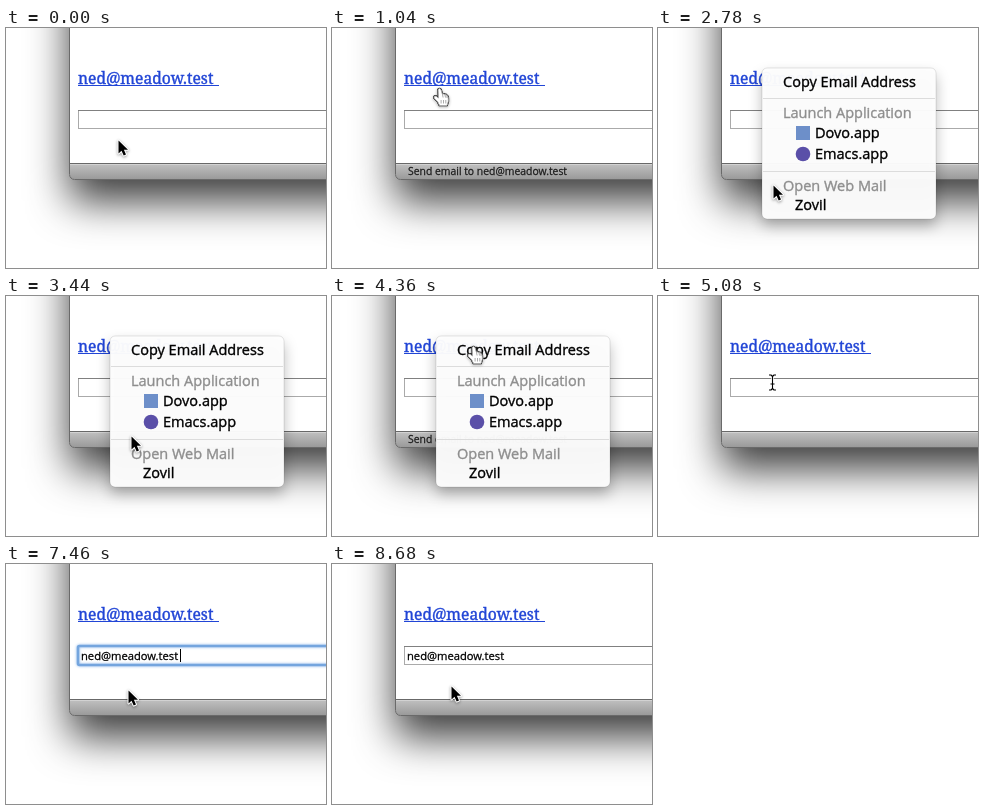
An HTML page with a canvas for the animation above (8760 ms loop, 320 px wide and 240 px high).

```html
<!DOCTYPE html>
<html lang="en">
<head>
<meta charset="utf-8">
<title>Copying an email address</title>
<style>
html, body { margin: 0; width: 100%; height: 100%; overflow: hidden; background: #fff; }
canvas { display: block; }
</style>
</head>
<body>
<canvas id="stage" width="320" height="240"></canvas>
<script>
const ctx = document.getElementById('stage').getContext('2d');
const LOOP = 8760;
const ADDRESS = 'ned@meadow.test';
const SANS = '"Open Sans", "Noto Sans", sans-serif';
const SERIF = '"Noto Serif", "Liberation Serif", serif';

// Pointer path: time, x, y, optional power that delays the easing
const PATH = [
  [0, 112, 112], [440, 112, 112], [1300, 106, 46], [1380, 106, 46], [1420, 105, 45],
  [2180, 105, 45], [3020, 117, 185], [3840, 141, 50, 1.42], [4360, 141, 50],
  [5080, 114, 86], [5720, 114, 86], [6700, 128, 132], [7000, 128, 132],
  [7780, 119, 122], [LOOP, 119, 122]
];

const MENUS = [
  {
    x: 104, y: 40, w: 174, h: 151, open: 2180, close: 4360, rules: [70, 143], row: 20,
    items: [
      ['Copy Email Address', 125, 59], ['Launch Application', 125, 90, true],
      ['Dovo.app', 157, 110], ['Emacs.app', 157, 131],
      ['Open Web Mail', 125, 163, true], ['Zovil', 137, 182]
    ],
    icons() {
      ctx.fillStyle = '#6d8fc9';
      ctx.fillRect(138, 98, 14, 14);
      ctx.fillStyle = '#5a4fa8';
      ctx.beginPath();
      ctx.arc(145, 126, 7.3, 0, 7);
      ctx.fill();
    }
  },
  {
    x: 114, y: 80, w: 230, h: 200, open: 5700, close: 6920, rules: [149], row: 19,
    items: [
      ['Cut', 135, 99, true], ['Copy', 135, 118, true], ['Paste', 135, 137],
      ['Spelling and Grammar', 135, 168], ['Substitutions', 135, 187],
      ['Transformations', 135, 206], ['Font', 135, 225], ['Speech', 135, 244]
    ]
  }
];

const clamp = v => Math.max(0, Math.min(1, v));
const within = (t, a, b) => t >= a && t < b;

function pointerAt(t) {
  const i = PATH.findIndex(k => k[0] > t);
  const [t0, x0, y0] = PATH[i - 1], [t1, x1, y1, power = 1] = PATH[i];
  const u = ((t - t0) / (t1 - t0)) ** power;
  const p = u * u * (3 - 2 * u);
  return { x: x0 + (x1 - x0) * p, y: y0 + (y1 - y0) * p };
}

// A hairline stroke gives the slightly heavy look of smoothed type
function text(str, x, y, size, color, family = SANS) {
  ctx.font = `${size}px ${family}`;
  ctx.fillStyle = ctx.strokeStyle = color;
  ctx.lineWidth = size * .025;
  ctx.fillText(str, x, y);
  ctx.strokeText(str, x, y);
}

function roundRect(x, y, w, h, r) {
  ctx.beginPath();
  ctx.roundRect(x, y, w, h, r);
}

function shadow(color, blur, dy) {
  ctx.shadowColor = color;
  ctx.shadowBlur = blur;
  ctx.shadowOffsetY = dy;
}

function vertical(y0, y1, ...colors) {
  const g = ctx.createLinearGradient(0, y0, 0, y1);
  colors.forEach((c, i) => g.addColorStop(i / (colors.length - 1), c));
  return g;
}

function drawWindow(status) {
  ctx.save();
  shadow('rgba(0,0,0,.76)', 40, 22);
  roundRect(63.5, -100, 400, 251.5, 5);
  ctx.fillStyle = '#fff';
  ctx.fill();
  ctx.restore();

  ctx.save();
  ctx.clip();
  ctx.fillStyle = vertical(135, 152, '#c2c2c2', '#989898');
  ctx.fillRect(63, 135, 257, 17);
  ctx.fillStyle = '#686868';
  ctx.fillRect(63, 135, 257, 1);
  ctx.fillStyle = '#d2d2d2';
  ctx.fillRect(63, 136, 257, 1);
  ctx.restore();
  ctx.strokeStyle = '#6a6a6a';
  ctx.lineWidth = 1;
  ctx.stroke();
  if (status) text('Send email to ' + ADDRESS, 76, 147, 10.4, '#1c1c1c');
}

function drawLink(active) {
  text(ADDRESS, 72, 56, 15.6, active ? '#d03a28' : '#2145d6', SERIF);
  ctx.fillRect(72, 57, 141, 1);
}

function drawField(focused, pasted, caret) {
  ctx.fillStyle = '#fff';
  ctx.fillRect(72, 82, 300, 19);
  ctx.lineWidth = 1;
  ctx.strokeStyle = '#aaa';
  ctx.strokeRect(72.5, 82.5, 300, 18);
  ctx.fillStyle = '#808080';
  ctx.fillRect(72, 82, 300, 1);
  if (focused) {
    ctx.save();
    shadow('#8db8ea', 3, 0);
    roundRect(72, 82, 300, 19, 1.5);
    ctx.strokeStyle = '#74a5de';
    ctx.lineWidth = 2.6;
    ctx.stroke();
    ctx.restore();
  }
  if (pasted) text(ADDRESS, 75, 96, 11.2, '#000');
  if (caret) {
    ctx.fillStyle = '#000';
    ctx.fillRect(pasted ? 174 : 75, 85, 1, 13);
  }
}

function drawMenu(menu, t, pointer) {
  const { x, y, w, h } = menu;
  const alpha = clamp((t - menu.open + 20) / 80) * clamp(1 - (t - menu.close) / 240);
  if (!alpha) return;
  ctx.save();
  ctx.globalAlpha = alpha;
  ctx.save();
  shadow('rgba(0,0,0,.28)', 14, 7);
  roundRect(x, y, w, h, 5);
  ctx.fillStyle = 'rgba(253,253,253,.97)';
  ctx.fill();
  ctx.restore();
  ctx.strokeStyle = 'rgba(0,0,0,.1)';
  ctx.lineWidth = 1;
  ctx.stroke();
  ctx.fillStyle = '#dcdcdc';
  menu.rules.forEach(ry => ctx.fillRect(x + 1, ry, w - 2, 1));

  for (const [label, tx, base, disabled] of menu.items) {
    const top = base - 15;
    const lit = !disabled && t < menu.close && within(pointer.y, top, top + menu.row);
    if (lit) {
      ctx.fillStyle = vertical(top, top + menu.row, '#5474f4', '#1b45ee');
      ctx.fillRect(x, top, w, menu.row);
    }
    text(label, tx, base, 14.5, lit ? '#fff' : disabled ? '#8e8e8e' : '#000');
  }
  if (menu.icons) menu.icons();
  ctx.restore();
}

const SHAPES = {
  arrow: new Path2D('M0 0V13L3 10.2L5.2 15L7.5 14L5.4 9.3H9.5Z'),
  hand: new Path2D('M-1.5 1Q0-1 1.5 1L3 6Q4.5 4.5 5.5 6.3Q7 5.3 7.5 7.3Q8.8 7 8.8 10V13L7.5 17H0L-2 13L-5.5 9.5Q-6 7 -3.5 7.5L-1 9.5Z'),
  creases: new Path2D('M3 6L3.6 9M5.5 6.3L6 9M7.5 7.3V9.5M1.6 11.5V15M4 11.5V15M6.3 11.5V15'),
  beam: new Path2D('M-3.5-7.5H-1.5L0-6L1.5-7.5H3.5M0-6V6M-3.5 7.5H-1.5L0 6L1.5 7.5H3.5M-2 1.5H2')
};

function drawPointer(kind, { x, y }) {
  ctx.save();
  ctx.translate(Math.round(x) + .5, Math.round(y) + .5);
  ctx.lineJoin = 'round';
  if (kind === 'beam') {
    ctx.strokeStyle = '#fff';
    ctx.lineWidth = 2.5;
    ctx.stroke(SHAPES.beam);
    ctx.strokeStyle = '#000';
    ctx.lineWidth = 1.1;
    ctx.stroke(SHAPES.beam);
  } else {
    const hand = kind === 'hand';
    ctx.save();
    shadow('rgba(0,0,0,.4)', 3, 1);
    ctx.strokeStyle = hand ? '#000' : '#fff';
    ctx.lineWidth = hand ? 1.7 : 2;
    ctx.stroke(SHAPES[kind]);
    ctx.restore();
    ctx.fillStyle = hand ? '#fff' : '#000';
    ctx.fill(SHAPES[kind]);
    if (hand) {
      ctx.lineWidth = 1;
      ctx.stroke(SHAPES.hand);
      ctx.stroke(SHAPES.creases);
    }
  }
  ctx.restore();
}

function pointerKind({ x, y }, menuOpen) {
  if (menuOpen || x < 72) return 'arrow';
  if (within(y, 43, 62) && x < 213) return 'hand';
  return within(y, 82, 102) ? 'beam' : 'arrow';
}

function render(t) {
  const pointer = pointerAt(t);
  const menuOpen = MENUS.some(m => within(t, m.open, m.close));
  const kind = pointerKind(pointer, menuOpen);
  const focused = within(t, 5700, 8340);

  ctx.fillStyle = '#fff';
  ctx.fillRect(0, 0, 320, 240);
  drawWindow(kind === 'hand');
  drawLink(within(t, 1800, 2180));
  drawField(focused, t >= 7060, focused && (t < 7060 || (t - 7060) % 1000 < 500));
  MENUS.forEach(m => drawMenu(m, t, pointer));
  drawPointer(kind, pointer);
}

const start = performance.now();
function tick() {
  render((performance.now() - start) % LOOP);
  requestAnimationFrame(tick);
}
tick();
</script>
</body>
</html>
```
